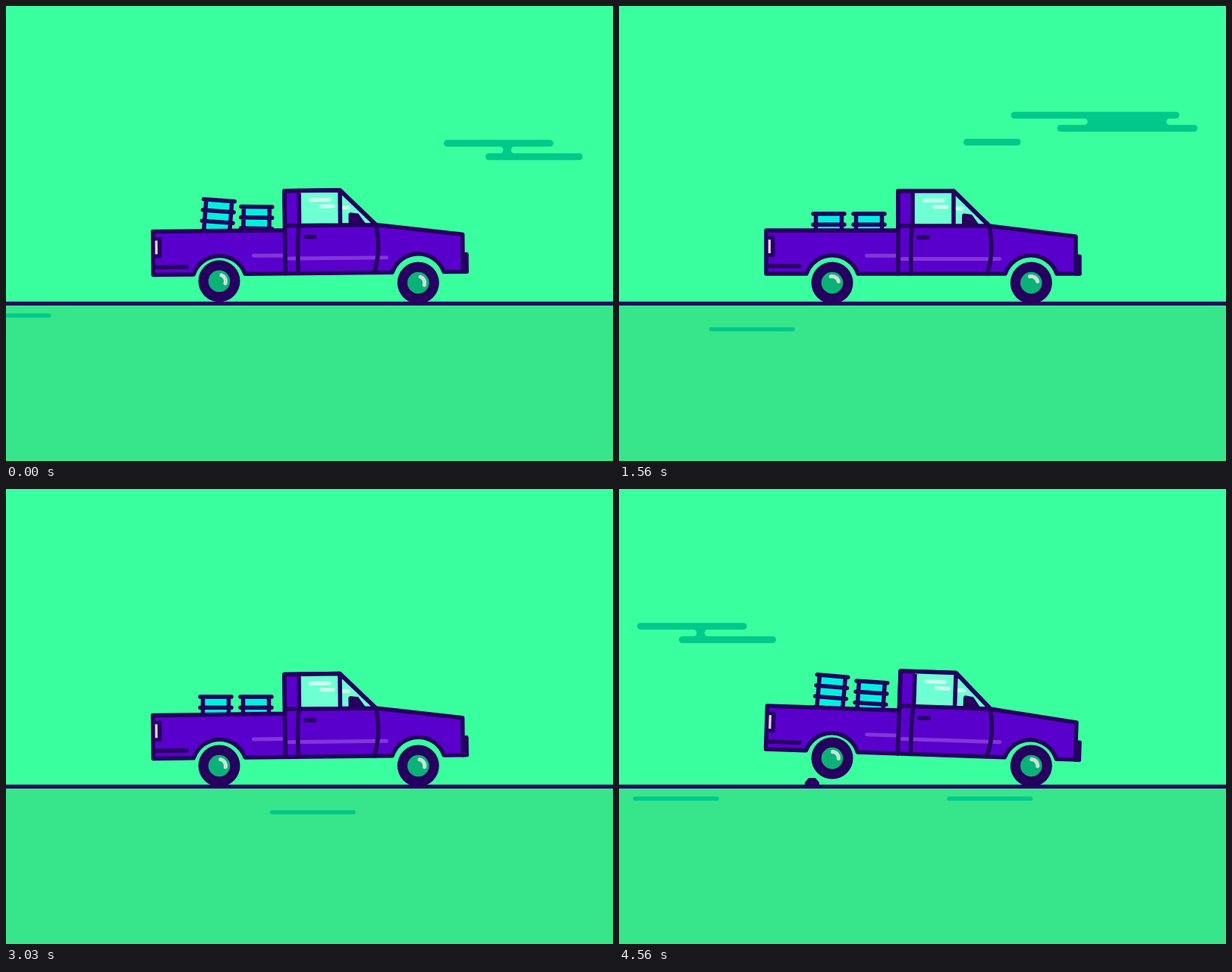
An HTML page for the animation above (4590 ms loop, 800 by 600 pixels).

```html
<!DOCTYPE html>
<html lang="en">
<head>
<meta charset="utf-8">
<title>Pickup truck</title>
<style>
html, body { margin: 0; width: 100%; height: 100%; overflow: hidden; background: #3aff9f; }
svg { display: block; width: 100vw; height: 100vh; }
.ink { stroke: #25005f; stroke-width: 5.5; stroke-linecap: round; stroke-linejoin: round; fill: none; }
.dark { fill: #25005f; }
.teal { fill: #00c98b; }
.bar { stroke: #00c98b; stroke-width: 9; stroke-linecap: round; }
.dash { stroke: #00c98b; stroke-width: 5.5; stroke-linecap: round; }
.glint { stroke: #ccfff0; stroke-width: 5; stroke-linecap: round; fill: none; }
.shine { stroke: #8236d8; stroke-width: 5; stroke-linecap: round; }
</style>
</head>
<body>
<svg viewBox="0 0 800 600" preserveAspectRatio="xMidYMid meet">
  <defs>
    <g id="cloudA">
      <path class="bar" d="M581.5 181H717M636.5 198.7H755.5"/>
      <path class="teal" d="M650.5 185A4.8 4.8 0 0 1 650.5 194.6H670.5A4.8 4.8 0 0 1 670.5 185Z"/>
    </g>
    <g id="cloudB">
      <path class="bar" d="M203.5 144H416.5M264.5 161.3H440.5M141 179.5H207.5"/>
      <path class="teal" d="M295.5 148A4.6 4.6 0 0 1 295.5 157.2H408.5A4.6 4.6 0 0 1 408.5 148Z"/>
    </g>
    <path id="boulder" class="teal" d="M0 391L10.5 369L27 361.5H54.5L68.5 391Z"/>
    <path id="rock" class="dark" d="M-9.5 391V387L-4.5 381H4.5L9.5 387V391Z"/>
    <path id="streak" class="dash" d="M2.7 0H110.3"/>
    <g id="barrel">
      <path fill="#00f0e0" d="M-17 0H17V57H-17Z"/>
      <path class="ink" d="M-17 0V57M17 0V57M-20.5 0H20.5M-20.5 14.3H20.5M-20.5 28.6H20.5M-20.5 43H20.5"/>
    </g>
    <g id="wheel">
      <circle class="dark" r="27.5"/>
      <circle r="14.3" fill="#0bb278"/>
    </g>
    <path id="gleam" d="M-1.8 -8.3A8.5 8.5 0 0 1 8.3 -1.8" fill="none" stroke="#c9e2da" stroke-width="5" stroke-linecap="round"/>
  </defs>

  <rect width="800" height="600" fill="#3aff9f"/>
  <g id="sky"></g>
  <rect y="392" width="800" height="208" fill="#37e58b"/>
  <g id="road"></g>
  <rect class="dark" y="389.8" width="800" height="5.2"/>

  <use id="left" href="#barrel"/>
  <use id="right" href="#barrel"/>

  <g id="body">
    <path class="ink" style="fill:#5a00cc" d="M194 296H368V244H441L488 290L602 304V353H577A36 36 0 0 0 509 353H315A36 36 0 0 0 247 353H194Z"/>
    <path fill="#6effd2" d="M387 245H440L486 290H387Z"/>
    <path class="glint" d="M402.5 256.5H427M416 265H432M445 267H452"/>
    <path class="shine" d="M326.5 329.2H364M373 333.4H501.5"/>
    <path class="ink" d="M368 244V353M387 244V290Q384 300 385 353M441 244V290M368 290H488M488 290Q495 325 485 353M368 244H441L488 290"/>
    <path class="ink" d="M395 305H407M196 343H238M602 353H607"/>
    <path class="dark" d="M454 273.5L465 275L475 289H452V275.5Z"/>
    <rect class="dark" x="194" y="303.5" width="11.5" height="27.5" rx="2"/>
    <rect x="196.7" y="308" width="3.2" height="18" fill="#e2d8ee"/>
    <rect class="dark" x="601" y="327.5" width="8.7" height="28" rx="2.5"/>
  </g>
  <g id="rear"><use href="#wheel"/><use class="gleam" href="#gleam"/></g>
  <g id="front"><use href="#wheel"/><use class="gleam" href="#gleam"/></g>
</svg>
<script>
const LOOP = 4590, STEP = 30;
const SKY_SPEED = 0.882, ROAD_SPEED = 1.76;
const BUMPS = [-76, 2680, 4560];  // rear wheel at its highest
const AXLE_DELAY = 180;           // front wheel leads by this much

const $ = id => document.getElementById(id);
const transform = (el, value) => el.setAttribute('transform', value);

// Scenery drifts left and is at x when the time is t0.
const movers = [];
function pass(layer, shape, speed, t0, x, y = 0) {
  const el = document.createElementNS('http://www.w3.org/2000/svg', 'use');
  el.setAttribute('href', '#' + shape);
  $(layer).append(el);
  movers.push(t => transform(el, `translate(${x - speed * (t - t0)} ${y})`));
}
const enter = (shape, t0, y) => pass('road', shape, ROAD_SPEED, t0, 800, y);

pass('sky', 'cloudA', SKY_SPEED, 0, 0);
pass('sky', 'cloudA', SKY_SPEED, 3933, 0);
pass('sky', 'cloudB', SKY_SPEED, 1920, 0);
pass('sky', 'boulder', ROAD_SPEED, 783, 800);
[-485, 713, 4116, 4351].forEach(t => enter('streak', t, 408.3));
[576, 1173, 2075, 2273.5, 2773, 3673].forEach(t => enter('streak', t, 426.3));
[2165, 4250].forEach(t => enter('rock', t));

// Pulses from 0 to 1 and back: s is the time from the peak, w the half width.
const hump = (s, w) => Math.abs(s) < w ? (1 + Math.cos(Math.PI * s / w)) / 2 : 0;
const toss = (s, w) => Math.max(0, 1 - (s / w) ** 2);
const settle = s => s < 0 ? 0 : Math.min(1, s / 60) * Math.max(0, 1 - s / 880);
const sum = fn => BUMPS.reduce((total, b) => total + fn(b), 0);

// Barrels rock about the middle of their base; each bump throws them, and a small rattle follows.
function barrel(id, x, t, press, { width, height, lean, power, dip, back }) {
  const air = sum(b => toss(t - b - 10, width) + 0.2 * toss(t - b - 1246, width));
  const angle = lean * air ** power - back * press;
  const y = 331 - height * air + dip * press;
  transform($(id), `translate(${x} ${y}) rotate(${angle}) translate(0 -57)`);
}

function wheel(id, x, lift, spin) {
  transform($(id), `translate(${x} ${365 - lift})`);
  transform($(id).querySelector('.gleam'), `rotate(${spin})`);
}

function draw(t) {
  const front = sum(b => hump(t - b + AXLE_DELAY, 110));
  const rear = sum(b => hump(t - b, 110));
  const rest = sum(b => settle(t - b));
  const tilt = 1.95 * rear - 2.15 * front - 1.1 * rest;
  const heave = 3 * rear + 0.8 * front;
  const spin = 23 * front + 15 * rear + 30 * Math.sqrt(rest);

  movers.forEach(move => move(t));
  barrel('left', 276.5, t, front, { width: 110, height: 28, lean: 5, power: 0.3, dip: 5.5, back: 8.3 });
  barrel('right', 329.5, t, front, { width: 90, height: 20, lean: 4, power: 2, dip: 4.5, back: 5.8 });
  transform($('body'), `translate(0 ${-heave}) rotate(${tilt} 400 335)`);
  wheel('rear', 281, 10 * rear, spin);
  wheel('front', 543.3, 8.5 * front, spin);
}

const start = performance.now();
function tick() {
  const t = (performance.now() - start) % LOOP;
  draw(Math.floor(t / STEP) * STEP);
  requestAnimationFrame(tick);
}
draw(0);
requestAnimationFrame(tick);
</script>
</body>
</html>
```
